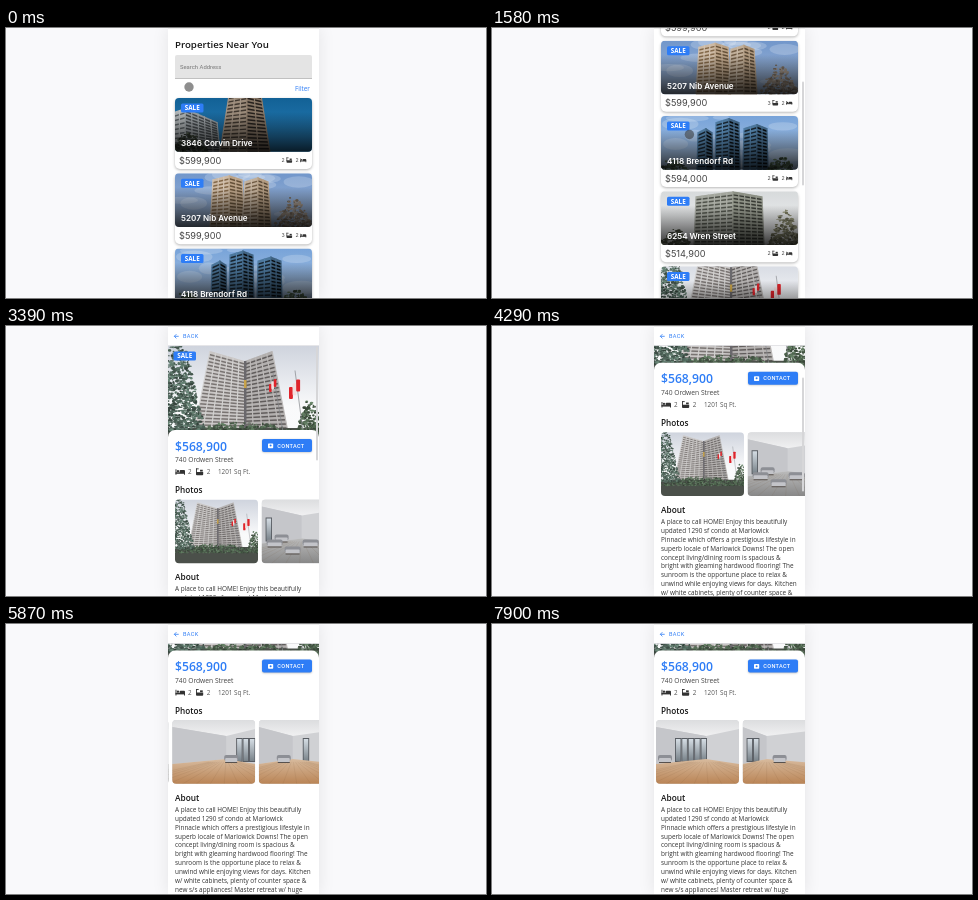
These frames come from a looping animation (480x270 px, 8000 ms). An HTML page with a canvas:

```html
<!DOCTYPE html>
<html lang="en">
<head>
<meta charset="utf-8">
<title>Property listings</title>
<style>
html, body { margin: 0; width: 100%; height: 100%; overflow: hidden; background: #f9f9fb; }
canvas { display: block; }
</style>
</head>
<body>
<canvas id="stage" width="480" height="270"></canvas>
<script>
const ctx = document.getElementById('stage').getContext('2d');
const LOOP = 8000, STEP = LOOP / 71;
const LEFT = 162, WIDTH = 151, MARGIN = 169;
const BLUE = '#2e7df6', INK = '#161616', GREY = '#444';
const OPEN = '"Open Sans", sans-serif', ROBOTO = 'Roboto, sans-serif', INTER = 'Inter, sans-serif';

// ---- drawing helpers ----
function box(fill, x, y, w, h, r = 0) {
  ctx.fillStyle = fill;
  ctx.beginPath();
  ctx.roundRect(x, y, w, h, r);
  ctx.fill();
}
function poly(fill, ...points) {
  ctx.fillStyle = fill;
  ctx.beginPath();
  for (const [x, y] of points) ctx.lineTo(x, y);
  ctx.fill();
}
function line(color, width, [x0, y0], [x1, y1]) {
  ctx.strokeStyle = color;
  ctx.lineWidth = width;
  ctx.beginPath();
  ctx.moveTo(x0, y0);
  ctx.lineTo(x1, y1);
  ctx.stroke();
}
function disc(fill, x, y, rx, ry = rx) {
  ctx.fillStyle = fill;
  ctx.beginPath();
  ctx.ellipse(x, y, rx, ry, 0, 0, 7);
  ctx.fill();
}
function text(str, x, y, font, color, spacing = 0) {
  ctx.font = font;
  ctx.fillStyle = color;
  ctx.letterSpacing = spacing + 'px';
  ctx.fillText(str, x, y);
}
function fade(y0, y1, from, to) {
  const g = ctx.createLinearGradient(0, y0, 0, y1);
  g.addColorStop(0, from);
  g.addColorStop(1, to);
  return g;
}
function shadowed(blur, dy, alpha, draw) {
  ctx.save();
  ctx.shadowColor = `rgba(0,0,0,${alpha})`;
  ctx.shadowBlur = blur;
  ctx.shadowOffsetY = dy;
  draw();
  ctx.restore();
}
function clipped(x, y, w, h, r, draw) {
  ctx.save();
  ctx.beginPath();
  ctx.roundRect(x, y, w, h, r);
  ctx.clip();
  ctx.translate(x, y);
  draw();
  ctx.restore();
}
const hsl = (h, s, l) => `hsl(${h} ${s}% ${l}%)`;
const mix = (a, b, u) => a + (b - a) * u;
const between = (p, q, u) => [mix(p[0], q[0], u), mix(p[1], q[1], u)];
function track(t, keys) {
  if (t <= keys[0][0]) return keys[0][1];
  for (let i = 1; i < keys.length; i++) {
    const [t0, a] = keys[i - 1], [t1, b] = keys[i];
    if (t < t1) return mix(a, b, (t - t0) / (t1 - t0));
  }
  return keys.at(-1)[1];
}
function randomizer(seed) {
  return () => (seed = (seed * 16807) % 2147483647) / 2147483647;
}

// ---- outdoor pictures ----
function sky(hue, sat, light, clouds = 0) {
  box(fade(0, 60, hsl(hue, sat, light), hsl(hue, sat * 0.8, light + 14)), 0, 0, WIDTH, 113);
  const rnd = randomizer(hue * 991);
  for (let i = 0; i < clouds; i++)
    disc('rgba(240,244,250,.22)', rnd() * 137, rnd() * 50, 8 + rnd() * 14, 2 + rnd() * 5);
}
// One wall: dark balcony rows crossed by pale piers.
function wall(a, b, c, d, hue, sat, light) {
  poly(hsl(hue, sat, light), a, b, c, d);
  const rows = Math.round((d[1] - a[1]) / 3.5), cols = Math.round((b[0] - a[0]) / 6);
  for (let i = 1; i <= rows; i++)
    line(hsl(hue, sat, light - 32), 1.5, between(a, d, i / rows), between(b, c, i / rows));
  for (let i = 0; i <= cols; i++)
    line(hsl(hue, sat, light + 4), 1.2, between(a, b, i / cols), between(d, c, i / cols));
}
// Two walls meeting at a corner; dip moves the corner's top down or up.
function tower(x, w, top, [hue, sat, light], dip = -4, flare = 3, base = 54) {
  const mid = x + w * 0.56;
  const peak = [mid, top + dip], foot = [mid, base];
  wall([x, top], peak, foot, [x - flare, base], hue, sat, light);
  wall(peak, [x + w, top], [x + w + flare, base], foot, hue, sat, light - 9);
}
function tree(x, y, w, h, hue = 120, light = 22) {
  const rnd = randomizer(Math.round(x * 7 + h * 131 + 3000));
  for (let i = 0; i < w * h / 5; i++) {
    const v = Math.sqrt(rnd()), u = (rnd() - 0.5) * (0.25 + 0.75 * v);
    disc(hsl(hue, 12, light + rnd() * 26), x + w * u, y + h * v, 0.6 + rnd() * 1.6, 0.5 + rnd());
  }
}
function flag(x, y, s) {
  line('#85878c', 0.7, [x + 4 * s, y - 11 * s], [x + 14, 86]);
  for (let i = 0; i < 3; i++)
    box(i === 1 ? '#f2dede' : '#e0242b', x + i * 2.4 * s, y - i * 2.5 * s, 2.6 * s, 8 * s, 1);
}
function condo() {
  sky(220, 18, 84);
  tower(42, 62, 5, [20, 3, 78], 10, 16, 86);
  box('#6a686c', 76, 15, 2.5, 71);
  box('#c9a349', 76, 34, 2.5, 8);
  box('#4b504a', 0, 82, WIDTH, 31);
  tree(76, 76, 160, 16);
  tree(10, -6, 54, 92, 150);
  tree(142, 54, 30, 34);
  flag(101, 38, 1);
  flag(121, 41, 1.5);
}

const cards = [
  { name: '3846 Corvin Drive', price: '$599,900', baths: 2, beds: 2, paint() {
    sky(204, 78, 33);
    tower(-30, 72, 24, [200, 5, 70], -14);
    tower(54, 32, -3, [30, 14, 54], -4, 9);
    tree(14, 34, 44, 22, 100, 12);
  } },
  { name: '5207 Nib Avenue', price: '$599,900', baths: 3, beds: 2, paint() {
    sky(215, 46, 62, 14);
    tower(38, 29, 6, [32, 28, 72]);
    tower(70, 23, 8, [32, 24, 68]);
    tree(118, 24, 40, 30, 30, 40);
  } },
  { name: '4118 Brendorf Rd', price: '$594,000', baths: 2, beds: 2, paint() {
    sky(213, 56, 66, 16);
    for (const [x, top] of [[37, 16], [55, 6], [83, 12]]) tower(x, x === 37 ? 14 : 23, top, [208, 34, 46], -4, 1);
    tree(120, 40, 34, 16);
    tree(12, 42, 34, 14);
  } },
  { name: '6254 Wren Street', price: '$514,900', baths: 2, beds: 2, paint() {
    sky(200, 6, 85);
    tower(35, 66, 5, [80, 5, 63], -5, 2);
    tree(124, 18, 34, 38, 60, 32);
    tree(14, 38, 36, 18, 80);
  } },
  { name: '740 Ordwen Street', price: '$568,900', baths: 2, beds: 2, paint() {
    ctx.translate(0, -13);
    ctx.scale(0.907, 0.907);
    condo();
  } },
  { name: '8163 Quellmere', price: '$594,900', baths: 1, beds: 1, paint() {
    sky(210, 58, 64, 15);
    tower(40, 48, 7, [210, 4, 62], -4, 4);
    tree(17, 4, 48, 52, 95);
    tree(116, 40, 44, 16, 95);
  } },
  { name: '1935 Tarnell Way', price: '$579,900', baths: 2, beds: 2, paint() {
    sky(206, 62, 66, 10);
    tower(43, 52, 9, [205, 10, 68]);
  } },
  { name: '6402 Ostrel Court', price: '$549,900', baths: 2, beds: 1, paint() {
    sky(212, 42, 72, 10);
    tower(40, 52, 7, [34, 14, 66]);
  } },
];

// ---- indoor pictures, 83 x 64 ----
function sofa(x, y, w) {
  box('#8d8f95', x, y, w, 6, 2);
  box('#c3c4c9', x + 1, y + 3, w - 2, 4, 1);
  box('#57514d', x + 1, y + 7, w - 2, 1);
}
function room(corner, windowX, panes, sofaX, floorSat = 42) {
  box('#d0d1d4', 0, 0, 83, 64);
  poly(fade(0, 18, '#dcdddf', '#f3f3f4'), [0, 0], [83, 0], [83, 9], [corner, 16], [0, 7]);
  poly('#c5c6ca', [0, 7], [corner, 16], [corner, 39], [0, 44]);
  for (let i = 0; i < panes; i++) {
    box('#585c62', windowX + i * 6.4, 18, 6.4, 24);
    box(fade(18, 42, '#d9e1e8', '#747e85'), windowX + i * 6.4 + 0.9, 19, 4.6, 22);
  }
  poly(fade(39, 64, hsl(30, floorSat, 73), hsl(28, floorSat, 53)), [0, 44], [corner, 39], [83, 44], [83, 64], [0, 64]);
  for (let x = -60; x < 150; x += 14)
    line('rgba(110,80,50,.16)', 0.6, [mix(corner, x, 0.15), 42], [x, 64]);
  sofa(sofaX, 35, 14);
}
function lounge() {
  room(40, 4, 1, 13, 0);
  for (let i = 0; i < 4; i++) sofa(5 + i * 18, 40 + (i % 2) * 7, 16);
}
const rooms = [
  () => { ctx.translate(-2, 0); ctx.scale(0.58, 0.58); condo(); },
  lounge,
  () => room(54, 64, 3, 52),
  () => room(34, 44, 1, 18),
  () => room(30, 4, 3, 44),
  () => room(50, 19, 5, 2),
  () => room(24, 4, 2, 30),
  () => room(40, 50, 2, 10),
];

// ---- interface ----
function icon(x, y, s, draw) {
  ctx.save();
  ctx.translate(x, y);
  ctx.scale(s, s);
  draw();
  ctx.restore();
}
function bed() {
  box('#333', 0, -3, 1, 6);
  box('#333', 0, 0.3, 10, 1.6);
  box('#333', 4.3, -2, 5.7, 3, 1);
  box('#333', 9, 0, 1, 3);
  disc('#333', 2.6, -0.9, 1.2);
}
function bath() {
  box('#333', 0, -4, 1, 5);
  box('#333', 0, -4, 3, 1);
  box('#333', 0, 0, 8, 3.5, [0, 0, 1, 1]);
  box('#333', 4.5, -2.5, 3, 2);
}
function badge(x, y) {
  box(BLUE, x, y, 22.5, 9, 1.5);
  text('SALE', x + 3.8, y + 6.9, '700 6.3px ' + OPEN, '#fff');
}
function scrollbar(y, h) {
  box('#d6d6d8', 310, y, 2, h, 1);
}

function card(item, y) {
  shadowed(3, 1, 0.3, () => box('#fff', MARGIN, y, 137, 71, 5));
  clipped(MARGIN, y, 137, 53.7, 4, () => {
    ctx.save();
    item.paint();
    ctx.restore();
    box(fade(14, 54, 'rgba(0,0,0,0)', 'rgba(0,0,0,.8)'), 0, 0, 137, 54);
  });
  badge(175, y + 5.5);
  text(item.name, 175, y + 48, '600 8.1px ' + INTER, '#fff');
  text(item.price, 173, y + 65.7, '400 9.2px ' + INTER, GREY);
  text(item.baths, 275.5, y + 64, '400 5.2px ' + INTER, GREY);
  icon(280.5, y + 62.3, 0.7, bath);
  text(item.beds, 289.5, y + 64, '400 5.2px ' + INTER, GREY);
  icon(294, y + 62.3, 0.62, bed);
}

function listPage(t) {
  const scroll = track(t, [[230, 0], [1126, 47.5], [2253, 260], [2816, 285]]);
  ctx.save();
  ctx.translate(0, -scroll);
  text('Properties Near You', MARGIN, 19.5, '600 9.7px ' + OPEN, INK);
  box('#e4e4e4', MARGIN, 27, 137, 23.5, [2, 2, 0, 0]);
  box('#8f8f8f', MARGIN, 50, 137, 0.6);
  text('Search Address', 174, 41.3, '400 5.9px ' + ROBOTO, '#777');
  text('Filter', 289, 62.6, '400 6.4px ' + OPEN, BLUE);
  cards.forEach((item, i) => card(item, 70 + i * 75.3));
  ctx.restore();
  if (t > 330 && t < 3040) scrollbar(2.5 + scroll * 0.385, 104);

  const touched = t > 100;
  const x = touched ? track(t, [[1126, 191], [2253, 207]]) : 183;
  disc('rgba(50,50,50,.55)', x, touched ? 106.5 : 59, 4.7);
}

const about = [
  'A place to call HOME! Enjoy this beautifully',
  'updated 1290 sf condo at Marlowick',
  'Pinnacle which offers a prestigious lifestyle in',
  'superb locale of Marlowick Downs! The open',
  'concept living/dining room is spacious &',
  'bright with gleaming hardwood flooring! The',
  'sunroom is the opportune place to relax &',
  'unwind while enjoying views for days. Kitchen',
  'w/ white cabinets, plenty of counter space &',
  'new s/s appliances! Master retreat w/ huge',
];

function facts() {
  const label = (str, x) => text(str, x, 148.2, '400 6.3px ' + OPEN, '#555');
  text('$568,900', MARGIN, 124.5, '600 12.2px ' + OPEN, BLUE);
  text('740 Ordwen Street', MARGIN, 136, '400 6.7px ' + OPEN, GREY);
  icon(169.5, 146, 0.95, bed);
  label('2', 182);
  icon(190, 146, 0.9, bath);
  label('2', 200.7);
  label('1201 Sq Ft.', 212);
}
function contactButton() {
  shadowed(2, 0.6, 0.25, () => box(BLUE, 256, 113, 50, 13, 2));
  box('#fff', 262, 117.4, 5.2, 4.8, 0.7);
  disc(BLUE, 264.6, 119.6, 1);
  text('CONTACT', 271.3, 121.5, '500 5.6px ' + ROBOTO, '#fff', 0.3);
}
function header() {
  box('#fff', LEFT, 0, WIDTH, 19.4);
  box('#dcdde0', LEFT, 19.2, WIDTH, 0.7);
  for (const end of [[172.7, 10.3], [170.4, 8.2], [170.4, 12.4]]) line(BLUE, 0.8, [168.3, 10.3], end);
  text('BACK', 177, 12.3, '400 5.6px ' + ROBOTO, BLUE, 0.3);
}

function detailPage(t) {
  const scroll = track(t, [[3500, 0], [4400, 77.4]]);
  const slide = track(t, [[4958, 0], [5859, 176], [7880, 438]]);
  ctx.save();
  ctx.translate(0, -scroll);
  clipped(LEFT, 20, WIDTH, 113, 0, condo);
  badge(167.5, 25.5);
  box('#fff', LEFT, 104, WIDTH, 300, [7, 7, 0, 0]);
  facts();
  contactButton();
  text('Photos', MARGIN, 167.4, '600 8.2px ' + OPEN, INK);
  rooms.forEach((paint, i) => clipped(MARGIN + i * 86.6 - slide, 173.5, 83, 63.7, 4, paint));
  text('About', MARGIN, 254, '600 8.3px ' + OPEN, INK);
  about.forEach((s, i) => text(s, MARGIN, 265.2 + i * 8.9, '400 6.4px ' + OPEN, '#333'));
  ctx.restore();
  if (t < 4700) scrollbar(20.5 + scroll * 0.46, 114);
  header();
}

function render(t) {
  box('#f9f9fb', 0, 0, 480, 270);
  shadowed(16, 0, 0.09, () => box('#fff', LEFT, 0, WIDTH, 270));
  clipped(LEFT, 0, WIDTH, 270, 0, () => {
    ctx.translate(-LEFT, 0);
    (t < 3260 ? listPage : detailPage)(t);
  });
  box('rgba(0,0,0,.1)', LEFT, 0, WIDTH, 0.7);
}

let shown = -1;
function tick() {
  const step = Math.floor((performance.now() % LOOP) / STEP);
  if (step !== shown) render(step * STEP);
  shown = step;
  requestAnimationFrame(tick);
}
tick();
</script>
</body>
</html>
```
